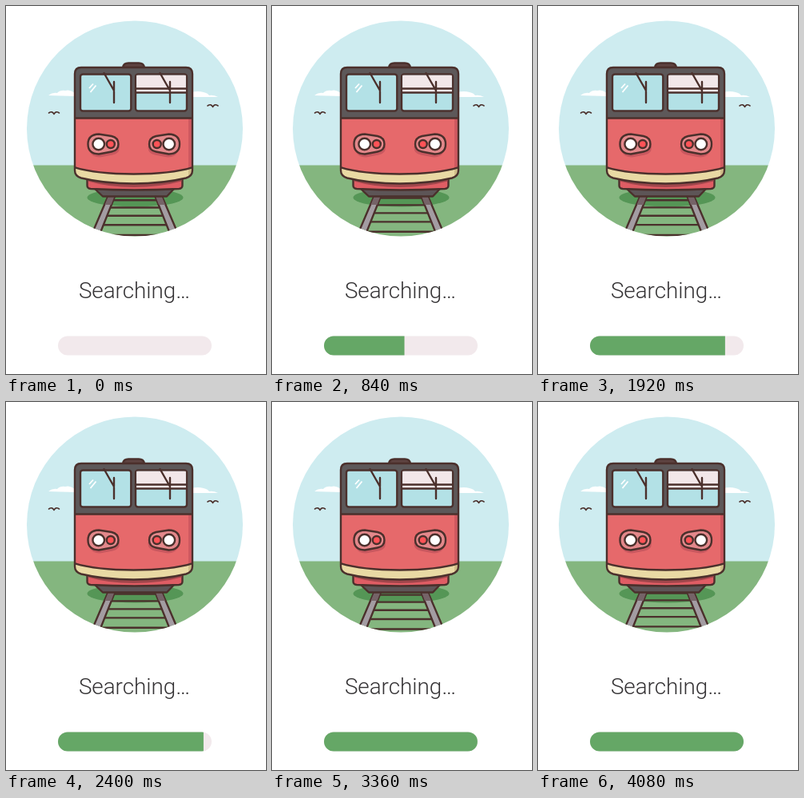
An HTML page that plays this animation: 325 px wide and 461 px high, repeating every 4.11 s.

```html
<!DOCTYPE html>
<html lang="en">
<head>
<meta charset="utf-8">
<title>Searching</title>
<style>
  html, body { margin: 0; width: 100%; height: 100%; overflow: hidden; background: #fff; }
  svg { display: block; width: 325px; height: 461px; }
  .line { stroke: #4b302c; stroke-width: 2.4; stroke-linejoin: round; stroke-linecap: round; }
  .thin { stroke-width: 1.6; }
  .open { fill: none; }
</style>
</head>
<body>
<svg viewBox="0 0 325 461" xmlns="http://www.w3.org/2000/svg">
  <defs>
    <clipPath id="disc"><circle cx="161" cy="153.5" r="135"/></clipPath>
    <clipPath id="pill"><rect x="65" y="413.5" width="192" height="24" rx="12"/></clipPath>
    <clipPath id="shell">
      <path id="hull" d="M94 77H225Q233 77 233 85V206Q233 213 225 215.500Q196 222.500 159.500 222.500T94 215.500Q86 213 86 206V85Q86 77 94 77Z"/>
    </clipPath>
    <path id="wiper" class="line open" d="M122.500 84L135 106M135 95V121"/>
    <path id="housing" d="M116 160.500L132 163Q140.500 165 140.500 173T132 182.500L116 185.500Q102.500 185 102.500 173T116 160.500Z"/>
    <g id="lamp">
      <use href="#housing" x="1.500" y="4" fill="#c9585f"/>
      <use href="#housing" class="line" fill="#e3888b"/>
      <circle class="line" cx="115.700" cy="173" r="7.300" fill="#fff"/>
      <circle class="line" cx="130.800" cy="173" r="5" fill="#ff5357"/>
    </g>
  </defs>

  <g clip-path="url(#disc)">
    <path d="M26 18H297V200H26Z" fill="#ceecf0"/>
    <path d="M26 199.500H297V290H26Z" fill="#84b67f"/>
    <g fill="#fff">
      <path d="M53 112Q58 108 64 109Q68 105 74 106Q80 104 86 109V113Z"/>
      <path d="M232 108Q240 106 247 108Q252 109 254 112Q259 111 265 114H232Z"/>
    </g>
    <g class="line thin open">
      <path d="M53.500 134Q58 131 60 135.500Q62 131 66.500 134"/>
      <path d="M252 125Q256.500 122 258.500 126.500Q260.500 122 265 125"/>
    </g>

    <ellipse cx="161.500" cy="240" rx="60" ry="11.500" fill="#559656"/>
    <path id="sleepers" class="line open"/>
    <g class="line" fill="#a39ca2">
      <path d="M128.500 236H137L115.500 290H105.500Z"/>
      <path d="M194 236H185.500L207 290H217Z"/>
    </g>
    <path d="M128.500 237H136L131.500 249H123.500ZM194 237H186.500L191 249H199Z" fill="#756367"/>

    <path class="line" d="M111 229H210L201 238.500H121Z" fill="#5d5557"/>
    <path class="line" d="M101.500 215H220.500V225Q220.500 228.500 216 229Q160 232 106 229Q101.500 228.500 101.500 225Z" fill="#df5d64"/>
    <path d="M102.500 216H219.500V219.500Q192 227 160 227T102.500 219.500Z" fill="#a0464b"/>

    <path class="line" d="M146 77Q147 71.500 153 71.500H166Q172 71.500 173 77Z" fill="#5e4341"/>
    <g clip-path="url(#shell)">
      <path d="M85 76H234V224H85Z" fill="#e6696b"/>
      <path d="M228 140H234V224H228Z" fill="#cf5960"/>
      <path d="M85 202Q112 210.500 159.500 210.500T234 202V224H85Z" fill="#e9d9a4"/>
      <path d="M228 204L234 202V224H228Z" fill="#d0bd89"/>
      <path class="line open" d="M85 202Q112 210.500 159.500 210.500T234 202"/>
      <path d="M85 76H234V140H85Z" fill="#5d5859"/>
      <path class="line open" d="M85 140.500H234"/>
    </g>
    <use href="#hull" class="line open"/>

    <rect x="93" y="85.500" width="63.300" height="46" rx="3" class="line" fill="#b3e1e6"/>
    <rect x="162" y="85.500" width="64" height="46" rx="3" class="line" fill="#b3e1e6"/>
    <path d="M163.200 86.700H224.800V108H163.200Z" fill="#f2e7e9"/>
    <path class="line open" d="M162.500 103.500H225.500M162.500 108.500H225.500"/>
    <use href="#wiper"/>
    <use href="#wiper" x="70"/>
    <path d="M104 103L109 97.500M105.500 108L112.500 99.500" fill="none" stroke="#fff" stroke-width="1.800"/>
    <use href="#lamp"/>
    <use href="#lamp" transform="translate(319.500 0) scale(-1 1)"/>
  </g>

  <text x="160.500" y="366" text-anchor="middle" font-family="Roboto, sans-serif" font-size="27.800" font-weight="350" fill="#343234">Searching…</text>
  <g clip-path="url(#pill)">
    <path d="M65 413H257V438H65Z" fill="#f2e9ec"/>
    <rect id="fill" x="65" y="413" width="0" height="25" fill="#65a766"/>
  </g>
</svg>
<script>
  const LOOP = 4110, FRAME = 30;
  const FILL_TIME = 3500, PULSE = 390;
  const fill = document.getElementById('fill');
  const sleepers = document.getElementById('sleepers');

  const bezier = (s, a, b) => 3 * (1 - s) ** 2 * s * a + 3 * (1 - s) * s * s * b + s ** 3;

  // Cubic Bezier timing, solved by bisection.
  function ease(x) {
    if (x >= 1) return 1;
    let lo = 0, hi = 1;
    for (let i = 0; i < 24; i++) {
      const mid = (lo + hi) / 2;
      if (bezier(mid, 0.145, 0.13) < x) lo = mid; else hi = mid;
    }
    return bezier(lo, 0, 1);
  }

  // Sleepers recede towards a vanishing point and advance two places per pulse.
  function sleeperPath(t) {
    const u = (t % PULSE) / PULSE;
    const phase = (0.28 + 2 * (1 - (1 - u) ** 2.5)) % 1;
    let d = '';
    for (let n = 39; n < 46; n++) {
      const y = 163 + 1.115 ** (n + phase);
      if (y < 234 || y > 291) continue;
      const half = 26 + (y - 239) * 0.4;
      d += `M${161.25 - half} ${y}H${161.25 + half}`;
    }
    return d;
  }

  function draw(t) {
    fill.setAttribute('width', 192 * ease(t / FILL_TIME));
    sleepers.setAttribute('d', sleeperPath(t));
  }

  const start = performance.now();
  function tick() {
    const t = (performance.now() - start) % LOOP;
    draw(Math.floor(t / FRAME) * FRAME);
    requestAnimationFrame(tick);
  }
  draw(0);
  requestAnimationFrame(tick);
</script>
</body>
</html>
```
